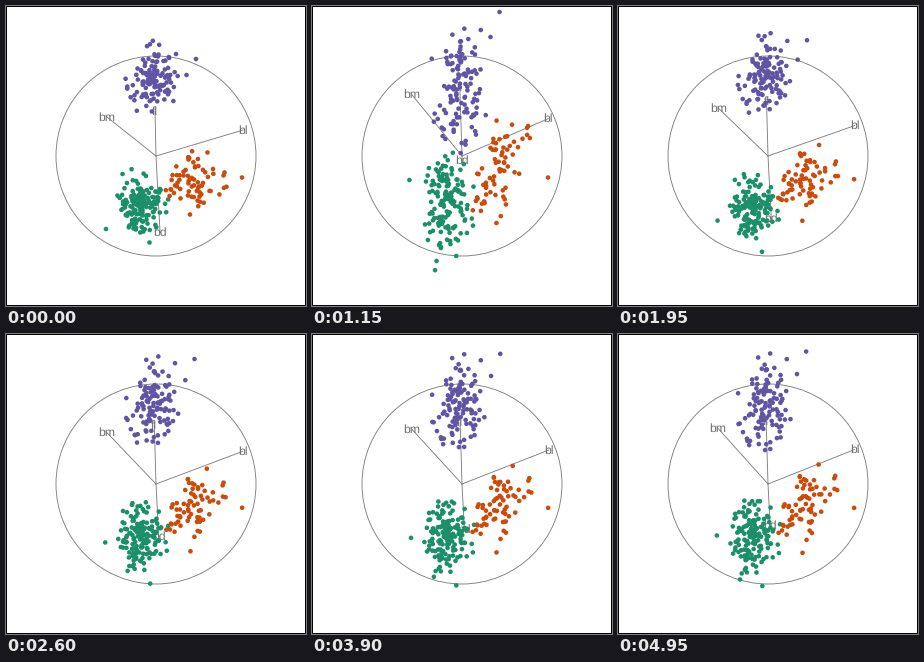
Recreate the animation shown at these times as a matplotlib script. Size 300 px wide and 300 px high, loop 5000 ms.

```python
import numpy as np
import matplotlib.pyplot as plt
from matplotlib.animation import FuncAnimation
from matplotlib.patches import Circle, Rectangle

plt.rcParams["text.hinting"] = "none"

SIZE, MID, RADIUS = 300, 150, 100
FRAMES, INTERVAL = 100, 50
HALF = 22                     # frames for one rotation of "bd" out of the plane
MAX_ANGLE = 0.865
DATA_SCALE = 166
PX = 0.72                     # one pixel in points at 100 dpi
GREY = "#7f7f7f"

# In-plane directions on screen: ALONG follows "bd", ACROSS stays fixed.
ALONG = np.array([0.0526, 0.9986])
ACROSS = np.array([0.9986, -0.0526])

# Each variable's share of the (across, along, rotated-out) directions.
NAMES = ["bl", "bd", "fl", "bm"]
BASIS = np.array([[0.883, -0.329, 0],
                  [0, 0, 1],
                  [0.014, -0.689, 0],
                  [-0.469, -0.640, 0]])
CENTRE = np.array([44, 17.16, 201, 4207])
RANGE = np.array([27.5, 8.4, 59, 3600])
SPREAD = np.array([1.9, 0.8, 5.2, 290])

# Colour, count, mean, half the gap between the two subgroups, and a few
# outliers as (x, y at the start, y one frame past the turn).
CLUSTERS = [
    ("#1b8f69", 146, (38.8, 18.35, 190, 3706), (1.5, 0.75, 2, 337),
     [(100, 223, 174), (143.5, 236.5, 250), (122, 207, 255)]),
    ("#cd4a08", 68, (48.8, 18.4, 196, 3733), (2.2, 0.85, 4, 206),
     [(236, 171.5, 171.5), (218.5, 166.5, 120), (184, 208.5, 217)]),
    ("#6254a5", 119, (47.5, 15, 217.5, 5085), (1.9, 0.75, 4.5, 400),
     [(170, 48, 24), (190, 53, 6), (180.5, 69, 31)]),
]


def angle(frame):
    return MAX_ANGLE * abs(1 - (frame % (2 * HALF)) / HALF)


def project(coords, theta):
    """Turn (across, along, rotated-out) rows into screen positions."""
    u = coords[:, 1] * np.cos(theta) + coords[:, 2] * np.sin(theta)
    return MID + np.outer(coords[:, 0], ACROSS) + np.outer(u, ALONG)


def sample(rng, count, mean, gap):
    """Bounded cloud of two subgroups whose variables share a factor."""
    side = np.where(np.arange(count) % 2, 1, -1)[:, None]
    shared = rng.triangular(-2.4, 0, 2.4, (count, 1))
    own = rng.triangular(-2.4, 0, 2.4, (count, 4))
    z = np.sqrt(0.25) * shared + np.sqrt(0.75) * own
    values = np.array(mean) + side * np.array(gap) + z * SPREAD
    return DATA_SCALE * ((values - CENTRE) / RANGE) @ BASIS


def lift(x, y_start, y_turn):
    """Recover the coordinates of a point from its two known heights."""
    start = np.array([x, y_start]) - MID
    v = start @ ACROSS
    u_turn = (y_turn - MID - v * ACROSS[1]) / ALONG[1]
    angles = np.array([MAX_ANGLE, angle(HALF + 1)])
    system = np.column_stack([np.cos(angles), np.sin(angles)])
    p, q = np.linalg.solve(system, [start @ ALONG, u_turn])
    return v, p, q


rng = np.random.default_rng(4)
parts, colours = [], []
for colour, count, mean, gap, outliers in CLUSTERS:
    parts.append(sample(rng, count - len(outliers), mean, gap))
    parts.append(np.array([lift(*spot) for spot in outliers]))
    colours += [colour] * count
points = np.vstack(parts)

fig = plt.figure(figsize=(3, 3), dpi=100, facecolor="white")
ax = fig.add_axes([0, 0, 1, 1])
ax.set(xlim=(0, SIZE), ylim=(SIZE, 0))
ax.axis("off")

ax.add_patch(Rectangle((0.5, 0.5), SIZE - 1, SIZE - 1, fill=False,
                       ec="black", lw=PX, snap=False, zorder=5))
ax.add_patch(Circle((MID, MID), RADIUS, fill=False, ec=GREY,
                    lw=0.9 * PX, zorder=1))
arms = [ax.plot([], [], color=GREY, lw=0.9 * PX, snap=False, zorder=1)[0]
        for _ in NAMES]
labels = [ax.text(MID, MID, name, color="#707070", family="Liberation Sans",
                  size=12.3 * PX, ha="center", va="center", zorder=2)
          for name in NAMES]
dots = ax.scatter(*project(points, MAX_ANGLE).T, c=colours,
                  s=(4.6 * PX) ** 2, linewidths=0, zorder=3)


def draw(frame):
    theta = angle(frame)
    dots.set_offsets(project(points, theta))
    for arm, label, (x, y) in zip(arms, labels, project(RADIUS * BASIS, theta)):
        arm.set_data([MID, x], [MID, y])
        label.set_position((x, y + 0.4))
    return [dots, *arms, *labels]


anim = FuncAnimation(fig, draw, frames=FRAMES, interval=INTERVAL,
                     repeat=True, repeat_delay=0)
plt.show()
```
